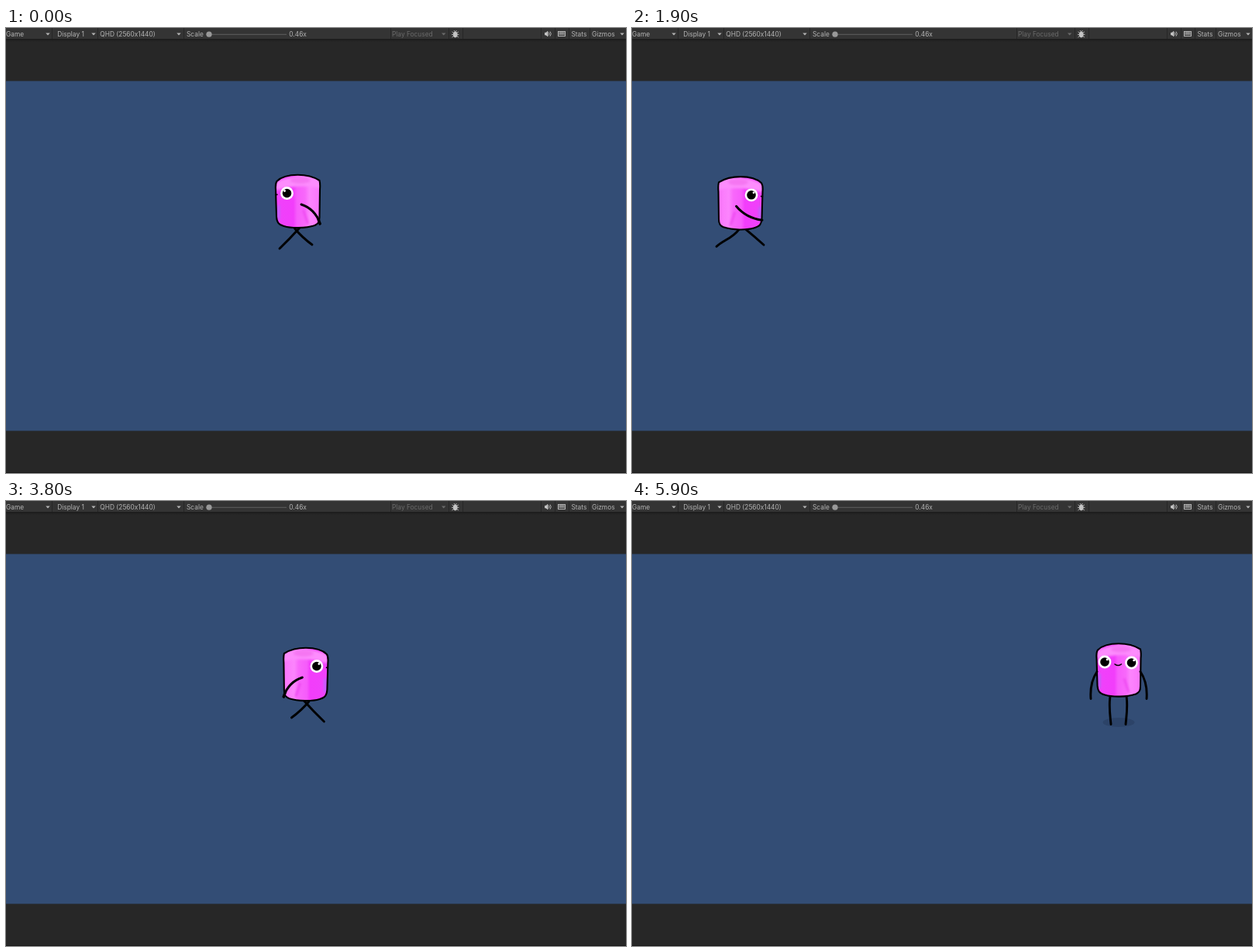
Recreate the animation shown at these times as an HTML page. Size 800 px wide and 575 px high, loop 6000 ms.

```html
<!DOCTYPE html>
<html lang="en">
<head>
<meta charset="utf-8">
<title>Walk cycle</title>
<style>
  html, body { margin: 0; width: 100%; height: 100%; overflow: hidden; background: #272727; }
  svg { display: block; width: 800px; height: 575px; }
  text { font: 8.35px Inter, "Liberation Sans", sans-serif; fill: #b4b4b4; }
  .limb { fill: none; stroke: #000; stroke-width: 2.9; stroke-linecap: round; stroke-linejoin: round; }
</style>
</head>
<body>
<svg viewBox="0 0 800 575">
  <defs>
    <linearGradient id="skin">
      <stop offset="0" stop-color="#ef42fa"/>
      <stop offset=".4" stop-color="#f23dfb"/>
      <stop offset=".48" stop-color="#f65cfb"/>
      <stop offset=".66" stop-color="#f868fb"/>
      <stop offset=".76" stop-color="#fc85fd"/>
      <stop offset="1" stop-color="#fa74fb"/>
    </linearGradient>
    <linearGradient id="barShade" x2="0" y2="1">
      <stop offset="0" stop-color="#1b1b1b"/>
      <stop offset="1" stop-color="#272727"/>
    </linearGradient>
    <filter id="soft"><feGaussianBlur stdDeviation="1.6"/></filter>
    <path id="outline" d="M-27 9C-20 2-8 .8 0 .8S20 3 28 8C29 12 29 14 28.5 20L28 56C28 62 26 64 22 66C10 70-8 70-18 67C-25 65-27 62-27.5 55L-28.5 20C-29 14-28.5 11-27 9Z"/>
    <clipPath id="inside"><use href="#outline"/></clipPath>
    <g id="eye">
      <circle r="8.4" fill="#fff"/>
      <circle r="5.8"/>
    </g>
  </defs>

  <!-- viewport -->
  <rect width="800" height="575" fill="#272727"/>
  <rect y="68.5" width="800" height="452" fill="#334d75"/>
  <path d="M0 574.5H800" stroke="#191919"/>

  <!-- toolbar -->
  <rect y="14" width="800" height="4" fill="url(#barShade)"/>
  <rect width="800" height="14" fill="#343434"/>
  <path id="dividers" stroke="#262626"/>
  <text x="0" y="10.7">Game</text>
  <text x="66.3" y="10.7">Display 1</text>
  <text x="121.3" y="10.7">QHD (2560x1440)</text>
  <text x="233" y="10.7">Scale</text>
  <text x="365.3" y="10.7">0.46x</text>
  <text x="498" y="10.7" style="fill:#6b6b6b">Play Focused</text>
  <text x="729.5" y="10.7">Stats</text>
  <text x="756" y="10.7">Gizmos</text>
  <path id="arrows" fill="#b4b4b4"/>
  <path d="M562 6.5h5.4l-2.7 3z" fill="#6b6b6b"/>
  <path d="M258 8.3H362" stroke="#606060"/>
  <circle cx="262" cy="8.2" r="3.6" fill="#999"/>
  <g stroke="#c4c4c4" fill="#c4c4c4" stroke-width=".9">
    <ellipse cx="579.7" cy="8.4" rx="2.4" ry="3.6"/>
    <path d="M575.5 4.8l8.4 7.2M583.9 4.8l-8.4 7.2M575 8.4h9.4M578 3l1 1.5M581.4 3l-1 1.5" fill="none"/>
    <path d="M695.5 6.2h1.5l2-1.8v6.4l-2-1.8h-1.5z"/>
    <path d="M700.5 5.8q1.4 1.8 0 3.6M702 4.6q2.6 3 0 6" fill="none"/>
    <rect x="712.5" y="4.5" width="9" height="6" fill="none"/>
    <path d="M713 6.4h8M713 8.3h8M715 4.5v4M717 4.5v4M719 4.5v4" fill="none" stroke-width=".7"/>
  </g>

  <!-- character, drawn facing left -->
  <g id="hero">
    <ellipse id="shadow" cy="102.5" rx="20.5" ry="6" fill="#2c4368"/>
    <g id="figure">
      <path id="legs" class="limb"/>
      <use href="#outline" fill="url(#skin)"/>
      <g clip-path="url(#inside)">
        <g filter="url(#soft)">
          <path d="M-28 10Q0-4 29 8V18Q0 12-28 21Z" fill="#fd8cfd"/>
          <ellipse cx="3" cy="8" rx="13" ry="4" fill="#f576f2"/>
          <path d="M-25 40V58" stroke="#b568fb" stroke-width="3"/>
          <path d="M7 46L13 64" stroke="#ec45ef" stroke-width="2.5"/>
        </g>
      </g>
      <use href="#outline" fill="none" stroke="#000" stroke-width="2.1"/>
      <g id="side">
        <use href="#eye" x="-14" y="24.5"/>
        <circle cx="-17" cy="21.5" r="1.4" fill="#fff"/>
        <path d="M-29 27L-26 26" stroke="#000" stroke-width="1.6"/>
      </g>
      <g id="front">
        <use href="#eye" x="-18" y="24.5"/>
        <use href="#eye" x="16.5" y="25.5"/>
        <circle cx="-14.8" cy="21.2" r="1.5" fill="#fff"/>
        <circle cx="19.7" cy="22.2" r="1.5" fill="#fff"/>
        <path d="M-5.5 27Q-1 31 4 27" fill="none" stroke="#000" stroke-width="1.4"/>
      </g>
      <path id="arms" class="limb"/>
    </g>
  </g>
</svg>
<script>
const el = id => document.getElementById(id);
const LOOP = 6000, TICK = 100, STRIDE = 1000 / 3;

el('dividers').setAttribute('d', [59.5, 118.5, 229.5, 496.5, 571.5, 589.5, 690.5, 708.5, 726.5, 753.5].map(x => `M${x} 0V14`).join(''));
el('arrows').setAttribute('d', [51.3, 110.3, 220.3, 792.3].map(x => `M${x} 6.5h5.4l-2.7 3z`).join(''));

const passing = {
  drop: 0, shadow: true,
  arms: 'M4.5 39C11 48 13 58 6 62Q0 66-7 65.5',
  legs: 'M-5.5 69L-4 101.5M4 70C-4 71-10 74-9 79C-8 83 0 84 8 87'
};
const armBack = {
  drop: 5.5,
  arms: 'M4.5 39C14 42 24 50 29 64M25 55L28.5 64.5L27.5 61',
  legs: 'M2.5 69Q-10 83-23.5 96M-4 70Q6 82 18.5 91'
};
const armForward = {
  drop: 7.8,
  arms: 'M5.5 39C-2 48-12 55-28 57',
  legs: 'M2 69C10 80 22 83 31 91M-7 69Q-18 78-30 89'
};
const standing = {
  drop: 0, shadow: true, front: true,
  arms: 'M-28 37C-34 46-37 58-36 72M28 37C34 46 37 58 36 72',
  legs: 'M-11 69C-13 82-11 94-10 105M10 69C12 82 10 94 9 105'
};
const walk = [armBack, passing, armForward, passing];

const stride = time => walk[Math.floor((time % STRIDE) / STRIDE * 4)];

// Walks left, turns, pauses briefly, walks right and stops.
function stateAt(t) {
  if (t < 1850) return { x: 376.5 - 0.134 * t, dir: 1, pose: stride(t + 10) };
  if (t < 2050) return { x: 140 + 0.134 * (t - 1900), dir: -1, pose: stride(t + 10) };
  if (t < 2150) return { x: 155.5, dir: 1, pose: standing };
  if (t < 5650) return { x: 294 + 0.1327 * (t - 3100), dir: -1, pose: stride(t - 2067) };
  return { x: 628, dir: 1, pose: standing };
}

function draw(now) {
  const t = Math.floor((now % LOOP) / TICK) * TICK;
  const { x, dir, pose } = stateAt(t);
  el('hero').setAttribute('transform', `translate(${x} 183.5) scale(${dir} 1)`);
  el('figure').setAttribute('transform', `translate(0 ${pose.drop})`);
  el('legs').setAttribute('d', pose.legs);
  el('arms').setAttribute('d', pose.arms);
  el('shadow').style.display = pose.shadow ? '' : 'none';
  el('front').style.display = pose.front ? '' : 'none';
  el('side').style.display = pose.front ? 'none' : '';
}

const start = performance.now();
function loop() {
  draw(performance.now() - start);
  requestAnimationFrame(loop);
}
loop();
</script>
</body>
</html>
```
